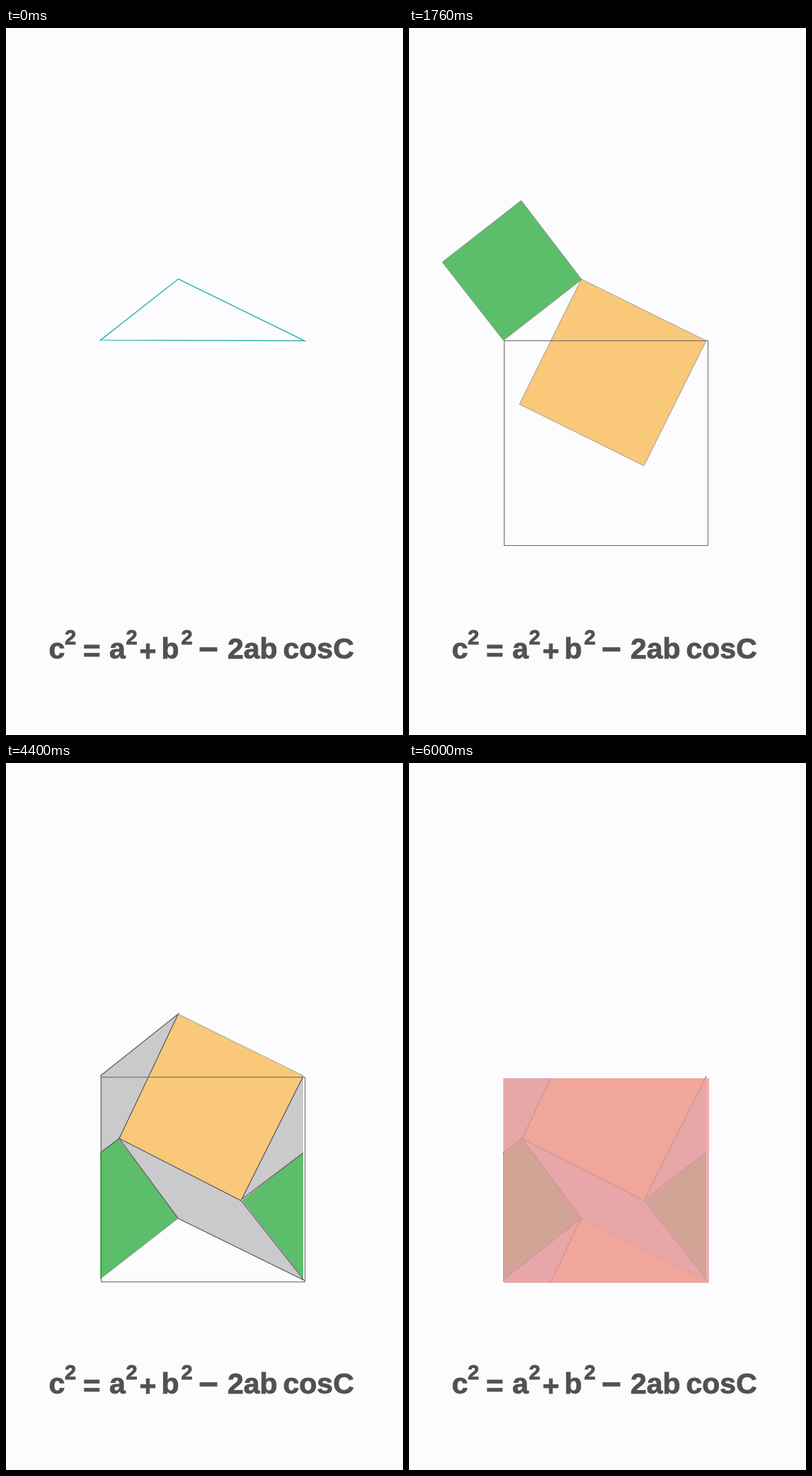
Recreate the animation shown at these times as an HTML page with a canvas. Size 561x998 px, loop 6040 ms.

```html
<!DOCTYPE html>
<html lang="en">
<head>
<meta charset="utf-8">
<title>Law of cosines</title>
<style>
html, body { margin: 0; width: 100%; height: 100%; overflow: hidden; background: #fcfcfe; }
canvas { display: block; width: 561px; height: 998px; }
</style>
</head>
<body>
<canvas id="stage" width="561" height="998"></canvas>
<script>
const ctx = document.getElementById('stage').getContext('2d');
const W = 561, H = 998, LOOP = 6040;
const CUT = { x: 133, y: 445, dx: 287, dy: 288 };
const PINK = 'rgb(238,158,160)';

const triangle = [[133.5, 440.6], [243.5, 354.3], [422, 441.5]];
const greenSquare = [[158.5, 243.5], [244, 355], [133.5, 441], [47, 330.5]];
const orangeSquare = [[243.5, 354.5], [420, 441.5], [332, 618], [156, 531]];
const leftGrey = [[133.5, 441.5], [243.5, 354], [160, 530], [46, 616]];
const lowerGrey = [[160, 530], [332.5, 618], [421, 730], [243.5, 643]];

const ramp = (t, start, length) => Math.min(1, Math.max(0, (t - start) / length));

// The picture advances on an 80 ms beat, shifted by half a beat mid-loop.
function beat(ms) {
  const shift = ms >= 2200 && ms < 4240 ? 40 : 0;
  return Math.floor((ms - shift) / 80) * 80 + shift;
}

function polygon(points, { fill, stroke, width = 1, dx = 0, dy = 0, alpha = 1 }) {
  if (alpha <= 0) return;
  ctx.save();
  ctx.globalAlpha *= alpha;
  ctx.translate(dx, dy);
  ctx.beginPath();
  points.forEach(([x, y]) => ctx.lineTo(x, y));
  ctx.closePath();
  if (fill) { ctx.fillStyle = fill; ctx.fill(); }
  if (stroke) { ctx.strokeStyle = stroke; ctx.lineWidth = width; ctx.stroke(); }
  ctx.restore();
}

function box(x, y, w, h, color, alpha, outline) {
  if (alpha <= 0) return;
  ctx.save();
  ctx.globalAlpha = alpha;
  ctx.fillStyle = ctx.strokeStyle = color;
  ctx.lineWidth = 1;
  if (outline) ctx.strokeRect(x, y, w, h);
  else ctx.fillRect(x, y, w, h);
  ctx.restore();
}

function pieces(t) {
  const appear = ramp(t, 320, 320);
  const slide = 1 - ramp(t, 960, 333);
  polygon(orangeSquare, {
    fill: 'rgb(249,200,121)', stroke: '#98a09c', alpha: appear,
    dx: 88 * slide, dy: -177 * slide
  });
  polygon(greenSquare, {
    fill: 'rgb(92,190,106)', stroke: t < 1360 ? '#66706a' : '#889288', alpha: appear,
    dy: 287 * ramp(t, 1920, 280)
  });
  const grey = { fill: 'rgb(202,202,204)', stroke: '#585a5c', width: 1.2, alpha: ramp(t, 2760, 320) };
  polygon(leftGrey, grey);
  polygon(lowerGrey, grey);
}

function region(t, x, y, w, h, dx, dy) {
  ctx.save();
  ctx.translate(Math.round(dx), Math.round(dy));
  ctx.beginPath();
  ctx.rect(x, y, w, h);
  ctx.clip();
  pieces(t);
  ctx.restore();
}

function formula() {
  ctx.fillStyle = ctx.strokeStyle = '#50524f';
  ctx.lineWidth = 0.9;
  const put = (text, x, y, size) => {
    ctx.font = `bold ${size}px "Liberation Sans", Arial, sans-serif`;
    ctx.fillText(text, x, y);
    ctx.strokeText(text, x, y);
  };
  const base = 889.5;
  [['c', 60.5], ['a', 146], ['b', 219.5], ['2ab', 313], ['cosC', 391.5]]
    .forEach(([text, x]) => put(text, x, base, 41));
  [83, 169.5, 247.5].forEach(x => put('2', x, 870, 29));
  put('=', 109, 893.5, 42);
  put('+', 188.5, 893, 41);
  put('−', 272, 893, 48);
}

function draw(ms) {
  const t = beat(ms);
  ctx.fillStyle = '#fcfcfe';
  ctx.fillRect(0, 0, W, H);

  if (t < 3960) {
    pieces(t);
  } else {
    const { x, y, dx, dy } = CUT;
    region(t, x, y, W, H, 0, 0);
    region(t, x, 0, W, y, 0, dy * ramp(t, 4560, 400));
    region(t, 0, 0, x, H, dx * ramp(t, 3880, 360), 0);
  }

  const appear = ramp(t, 320, 320);
  box(134, 441, 289, 290, PINK, 0.64 * appear * (1 - ramp(t, 1280, 320)));
  const drop = t < 3960 ? 0 : 2;
  box(134.5, 441.5 + drop, 288, 289, '#666864', appear * (1 - ramp(t, 4560, 400)), true);
  polygon(triangle, {
    stroke: t < 400 ? '#2fb0b0' : '#168c8c', width: 1.4,
    alpha: 1 - ramp(t, 1280, 320)
  });
  box(134, 445, 290, 289, PINK, 0.81 * ramp(t, 5360, 640));
  formula();
}

const begin = performance.now();
function tick() {
  draw((performance.now() - begin) % LOOP);
  requestAnimationFrame(tick);
}
tick();
</script>
</body>
</html>
```
